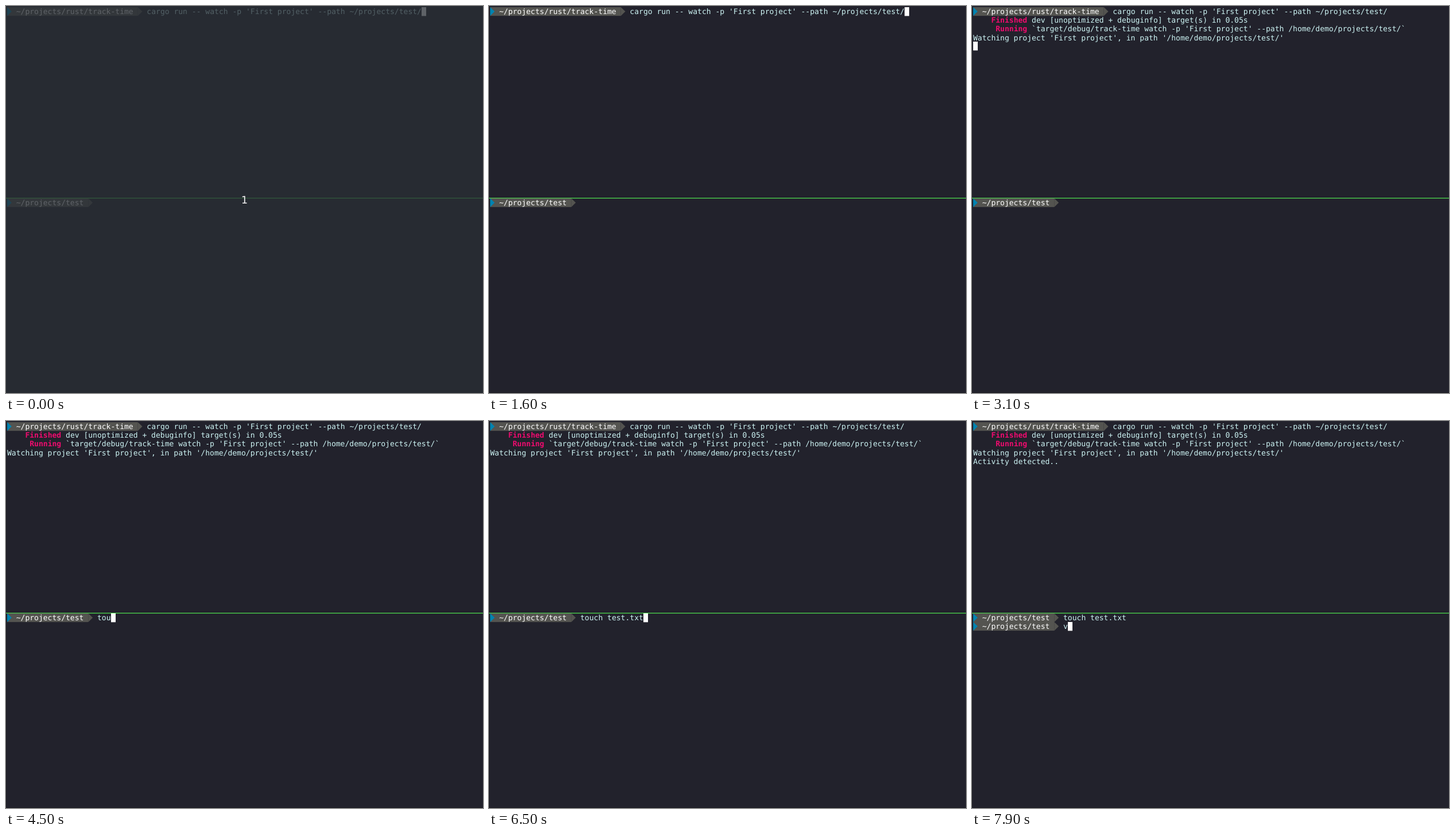
Write an HTML page with a canvas that moves like this. It is 831 px wide and 674 px high and loops after 8 s.

```html
<!DOCTYPE html>
<html lang="en">
<head>
<meta charset="utf-8">
<title>Terminal session</title>
<style>
  html, body { margin: 0; width: 100%; height: 100%; overflow: hidden; background: #22222c; }
  canvas { display: block; }
</style>
</head>
<body>
<canvas id="stage" width="831" height="674"></canvas>
<script>
const ctx = document.getElementById('stage').getContext('2d');
const W = 831, H = 674, LOOP = 8000;
const CELL = 7.85, LINE = 15.14, PAD = 2;
const LOWER = 22; // first row of the lower pane
const FONT = '13.04px "DejaVu Sans Mono", monospace';
const COLOR = {
  back: '#22222c', edge: '#191920', text: '#cdf4f4', white: '#ffffff',
  pink: '#ee0b6e', gray: '#545450', blue: '#0083b0', line: '#4fe34f'
};
const COMMAND = "cargo run -- watch -p 'First project' --path ~/projects/test/";
const TOUCH = 'touch test.txt';
const KEY_TIMES = [4300, 4500, 4500, 4600, 4700, 4800, 5400, 5500, 5700, 5800, 6000, 6100, 6300, 6500];

const x = col => PAD + col * CELL;
const y = row => PAD + row * LINE;

function write(text, row, col, color = COLOR.text, weight = '') {
  ctx.font = `${weight} ${FONT}`;
  ctx.fillStyle = color;
  ctx.fillText(text, x(col), y(row) + 12.1);
}

function arrow(row, col, color) {
  const top = Math.round(y(row));
  ctx.fillStyle = color;
  ctx.beginPath();
  ctx.moveTo(x(col), top);
  ctx.lineTo(x(col + 1), top + LINE / 2);
  ctx.lineTo(x(col), top + LINE);
  ctx.fill();
}

function prompt(row, path) {
  const end = path.length + 3;
  ctx.fillStyle = COLOR.gray;
  ctx.fillRect(PAD, Math.round(y(row)), end * CELL, LINE);
  arrow(row, 0, COLOR.blue);
  arrow(row, end, COLOR.gray);
  write(path, row, 2, COLOR.white);
}

function cursorAt(t) {
  if (t < 100 || (t >= 600 && t < 1100) || (t >= 1600 && t < 2100)) return [0, 31 + COMMAND.length];
  if (t >= 2100 && t < 2200) return [1, 0];
  if ((t >= 2200 && t < 2700) || (t >= 3100 && t < 3600)) return [4, 0];
  if ((t >= 3600 && t < 4000) || (t >= 4300 && t < 6600)) return [LOWER, 20 + typed(t)];
  if ((t >= 6600 && t < 7200) || (t >= 7700 && t < 7900)) return [LOWER + 1, 20];
  return t >= 7900 ? [LOWER + 1, 21] : null;
}

const typed = t => KEY_TIMES.filter(key => key <= t).length;

function countdown(opacity) {
  ctx.globalAlpha = opacity;
  ctx.fillStyle = 'rgba(41, 46, 53, 0.75)';
  ctx.fillRect(0, 0, W, H);
  ctx.font = '18px "DejaVu Sans", sans-serif';
  ctx.fillStyle = '#f0f0f0';
  ctx.textAlign = 'center';
  ctx.fillText('1', 415.5, 344);
  ctx.textAlign = 'left';
  ctx.globalAlpha = 1;
}

function draw(t) {
  ctx.fillStyle = COLOR.back;
  ctx.fillRect(0, 0, W, H);
  ctx.fillStyle = COLOR.edge;
  ctx.fillRect(0, 0, 1, H);
  ctx.fillRect(0, H - 1, W, 1);
  ctx.fillStyle = COLOR.line;
  ctx.fillRect(0, 334, W, 1.2);

  prompt(0, '~/projects/rust/track-time');
  write(COMMAND, 0, 31);
  if (t >= 2200) {
    write('Finished', 1, 4, COLOR.pink, 'bold');
    write('dev [unoptimized + debuginfo] target(s) in 0.05s', 1, 13);
    write('Running', 2, 5, COLOR.pink, 'bold');
    write("`target/debug/track-time watch -p 'First project' --path /home/demo/projects/test/`", 2, 13);
  }
  if (t >= 2300) write("Watching project 'First project', in path '/home/demo/projects/test/'", 3, 0);
  if (t >= 6800) write('Activity detected..', 4, 0);

  prompt(LOWER, '~/projects/test');
  write(TOUCH.slice(0, typed(t)), LOWER, 20);
  if (t >= 6600) prompt(LOWER + 1, '~/projects/test');
  if (t >= 7900) write('v', LOWER + 1, 20);

  const cursor = cursorAt(t);
  if (cursor) {
    ctx.fillStyle = COLOR.white;
    ctx.fillRect(Math.round(x(cursor[1])), Math.floor(y(cursor[0])), 8, 15.4);
  }
  if (t < 200) countdown(t < 100 ? 1 : 0.4);
}

ctx.textRendering = 'geometricPrecision';
function tick() {
  draw(performance.now() % LOOP);
  requestAnimationFrame(tick);
}
tick();
</script>
</body>
</html>
```
